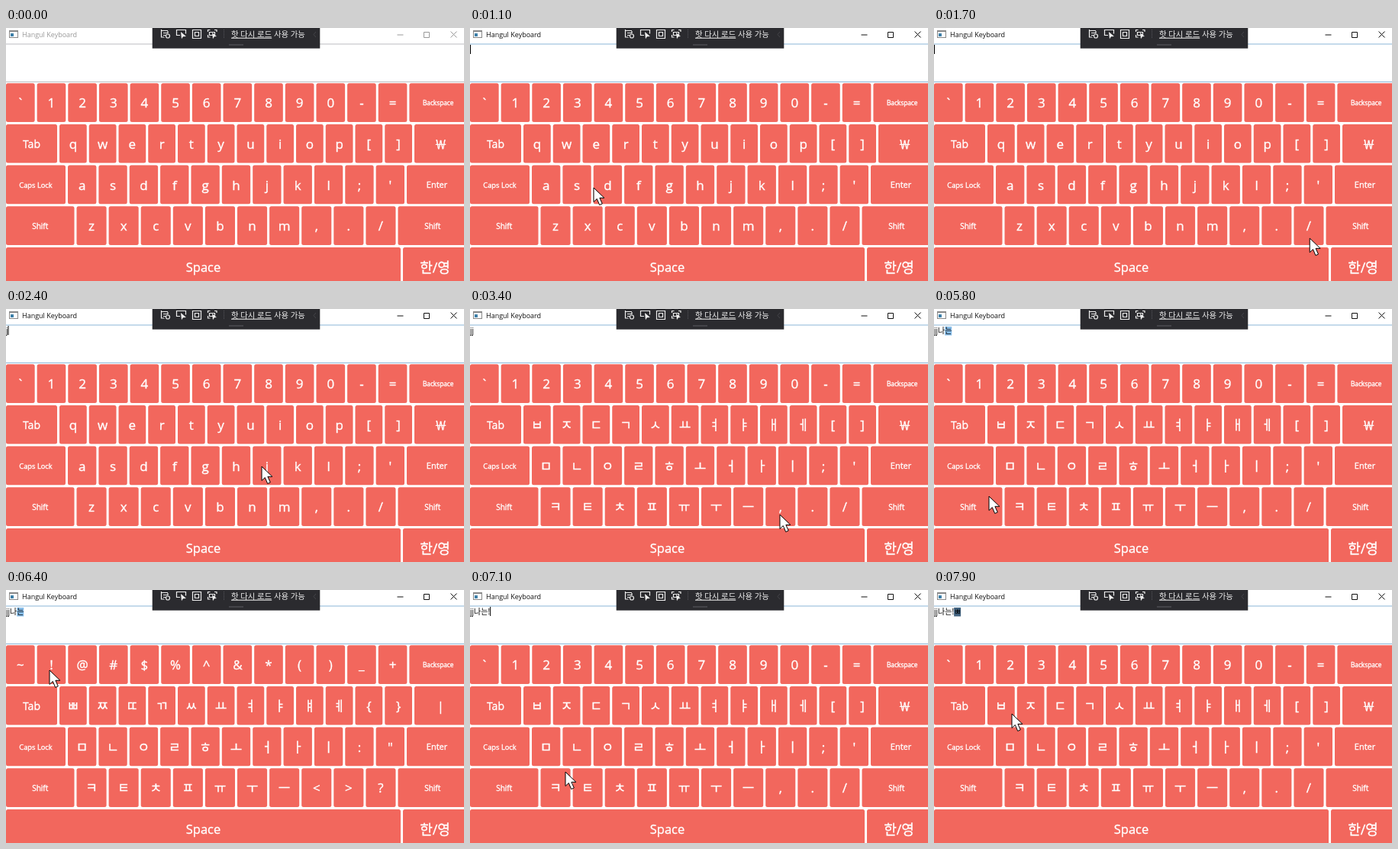
Animation of 600x331 px, one loop 8 s. Source, as an HTML page:

```html
<!DOCTYPE html>
<html lang="ko">
<head>
<meta charset="utf-8">
<style>
  html, body { margin: 0; width: 100%; height: 100%; overflow: hidden; background: #fff; }
  svg { display: block; width: 600px; height: 331px; }
  text { font-family: "Open Sans", "Noto Sans CJK KR", "Noto Sans CJK JP", sans-serif; white-space: pre; }
  #keys rect { fill: #f2675d; }
  #keys text { fill: #fff; stroke: #fff; stroke-width: .35; text-anchor: middle; }
  .tool { fill: none; stroke: #eee; stroke-width: 1.2; }
</style>
</head>
<body>
<svg viewBox="0 0 600 331">
  <rect width="600" height="331" fill="#fff"/>
  <g id="titlebar">
    <rect x="4.5" y="3.5" width="11" height="9" fill="#fff" stroke="#888"/>
    <rect x="4" y="3" width="12" height="2" fill="#888"/>
    <rect x="6" y="7" width="4" height="4" fill="#3d7fa8"/>
    <text id="title" x="21" y="12" font-size="9">Hangul Keyboard</text>
    <path id="buttons" fill="none" d="M512.5 9h8M547.5 5.500h7v7h-7zM582.500 4.500l8 8m0-8l-8 8"/>
  </g>
  <path id="border" fill="none" d="M0 21H600M0 70.5H600"/>
  <rect id="mark" y="23" width="9" height="11.5"/>
  <text id="done" y="31.5" font-size="10"></text>
  <text id="part" y="31.5" font-size="10"></text>
  <rect id="caret" y="22" width="1" height="12"/>
  <g id="keys"></g>
  <g id="toolbar">
    <rect x="191.700" width="219.600" height="26.700" fill="#2b2b2f"/>
    <path class="tool" d="M203.500 2v10h4M203 3.500h9M206 6.500h6M206 9.500h3M212 4v3"/>
    <circle class="tool" cx="212" cy="10.500" r="2.500"/>
    <path class="tool" d="M228 9.500h-4.500v-7h12v5"/>
    <path fill="#eee" d="M229 5l7 6-4 .3-2 3z"/>
    <path class="tool" d="M244.500 2.500h11v11h-11zM247.500 5.500h5v5h-5z"/>
    <path class="tool" d="M264.500 5v-2.500h3M273 2.500h3v2.500M264.500 9v3h3M266.500 5.500h7v4h-7z"/>
    <path fill="#eee" d="M270 6l6 5-3 .3-2 3z"/>
    <path stroke="#55555a" stroke-dasharray="1 1" d="M285.500 2v12"/>
    <text x="295" y="11.700" font-size="10.400" fill="#eee"><tspan text-decoration="underline">핫 다시 로드</tspan> 사용 가능</text>
    <path fill="none" stroke="#444449" d="M406 5l-3 3.500 3 3.500"/>
    <path stroke="#444449" stroke-width="2" d="M292 22h19"/>
  </g>
  <path id="cursor" fill="#fff" stroke="#000" stroke-linejoin="round"
    d="M0 0V18.500l4.300-4 3.400 8 3.600-1.600-3.400-7.600h6z"/>
</svg>
<script>
const $ = id => document.getElementById(id);
const GAP = 3;

// Character keys share the space between `from` and `to`; wider keys fill both sides.
// Side keys are [label, font size, shifted label].
const rows = [
  { from: 0, to: 528.4, right: ["Backspace", 8.3],
    en: "`1234567890-=", ko: "`1234567890-=", shift: "~!@#$%^&*()_+" },
  { from: 70, to: 535, left: ["Tab", 14], right: ["￦", 16, "|"],
    en: "qwertyuiop[]", ko: "ㅂㅈㄷㄱㅅㅛㅕㅑㅐㅔ[]", shift: "ㅃㅉㄸㄲㅆㅛㅕㅑㅒㅖ{}" },
  { from: 81, to: 525, left: ["Caps Lock", 9.3], right: ["Enter", 11],
    en: "asdfghjkl;'", ko: "ㅁㄴㅇㄹㅎㅗㅓㅏㅣ;'", shift: "ㅁㄴㅇㄹㅎㅗㅓㅏㅣ:\"" },
  { from: 92.5, to: 513.5, left: ["Shift", 10], right: ["Shift", 10],
    en: "zxcvbnm,./", ko: "ㅋㅌㅊㅍㅠㅜㅡ,./", shift: "ㅋㅌㅊㅍㅠㅜㅡ<>?" },
  { from: 520, to: 520, left: ["Space", 16.5], right: ["한/영", 18],
    en: "", ko: "", shift: "" }
];
const keys = [];

function addElement(tag, attrs) {
  const el = document.createElementNS("http://www.w3.org/2000/svg", tag);
  for (const name in attrs) el.setAttribute(name, attrs[name]);
  return $("keys").appendChild(el);
}

function addKey(x, y, width, size, en, ko = en, shift = ko) {
  addElement("rect", { x, y, width, height: 50.7, rx: 2.5 });
  const label = addElement("text", { x: x + width / 2, y: y + 25.7 + size * .38, "font-size": size });
  keys.push({ label, en, ko, shift });
}

rows.forEach(({ from, to, left, right, en, ko, shift }, i) => {
  const y = 72.2 + i * 53.7, pitch = (to - from) / en.length;
  if (left) addKey(0, y, from - GAP, left[1], left[0]);
  [...en].forEach((c, k) => addKey(from + k * pitch, y, pitch - GAP, 17, c, ko[k], shift[k]));
  addKey(to, y, 604 - to, right[1], right[0], right[0], right[2]);
});

// Pointer visits: arrival time, x, y, then the text and composing syllable if one is typed
const visits = [
  [100, 60, 30],
  [600, 110, 46, "", ""],
  [1100, 162, 209],
  [1500, 549, 300],
  [2300, 335, 206, "j", ""],
  [2600, 335, 206, "jj", ""],
  [3200, 555, 304],
  [3800, 141, 207, "jj", "ㄴ"],
  [4200, 385, 210, "jj", "나"],
  [4600, 139, 210, "jj", "난"],
  [5100, 365, 258, "jj나", "느"],
  [5500, 144, 208, "jj나", "는"],
  [5800, 72, 245],
  [6400, 57, 105],
  [6700, 57, 105, "jj나는!", ""],
  [7100, 125, 238],
  [7300, 76, 252],
  [7800, 102, 162, "jj나는!", "ㅃ"]
];

// Rest briefly at each stop, then glide to the next, slowing down on arrival.
function pointerAt(t) {
  const next = visits.findIndex(v => v[0] > t);
  const [t0, x0, y0] = visits.at(next < 0 ? -1 : next - 1);
  if (next < 0) return [x0, y0];
  const [t1, x1, y1] = visits[next], start = t0 + 100;
  const p = Math.max(0, (t - start) / (t1 - start)), e = p * (2 - p);
  return [x0 + (x1 - x0) * e, y0 + (y1 - y0) * e];
}

function draw(t) {
  const active = t >= 600;
  $("title").setAttribute("fill", active ? "#111" : "#999");
  $("buttons").setAttribute("stroke", active ? "#111" : "#999");
  $("border").setAttribute("stroke", active ? "#8ab6d8" : "#bbbcc0");

  const within = (a, b) => t >= a && t < b;
  const layer = within(5900, 6700) || within(7400, 7800) ? "shift" : t >= 3200 ? "ko" : "en";
  for (const key of keys) key.label.textContent = key[layer];

  const typed = visits.filter(v => v.length > 3 && v[0] <= t).pop();
  const [since, , , done, part] = typed || [0, 0, 0, "", ""];
  $("done").textContent = done;
  $("part").textContent = part;
  const end = done ? $("done").getComputedTextLength() : 0;
  $("part").setAttribute("x", end);
  $("mark").setAttribute("x", end);
  $("mark").setAttribute("fill", part ? (t >= 7800 ? "#41627f" : "#86bce8") : "none");
  $("caret").setAttribute("x", end);
  const blink = Math.floor((t - since) / 530) % 2 === 0;
  $("caret").setAttribute("visibility", active && !part && blink ? "visible" : "hidden");

  $("cursor").setAttribute("visibility", t < 100 ? "hidden" : "visible");
  if (t >= 100) $("cursor").setAttribute("transform", `translate(${pointerAt(t)})`);
}

// The screen refreshes ten times a second.
function tick() {
  draw(Math.floor(performance.now() % 8000 / 100) * 100);
  requestAnimationFrame(tick);
}
tick();
</script>
</body>
</html>
```
